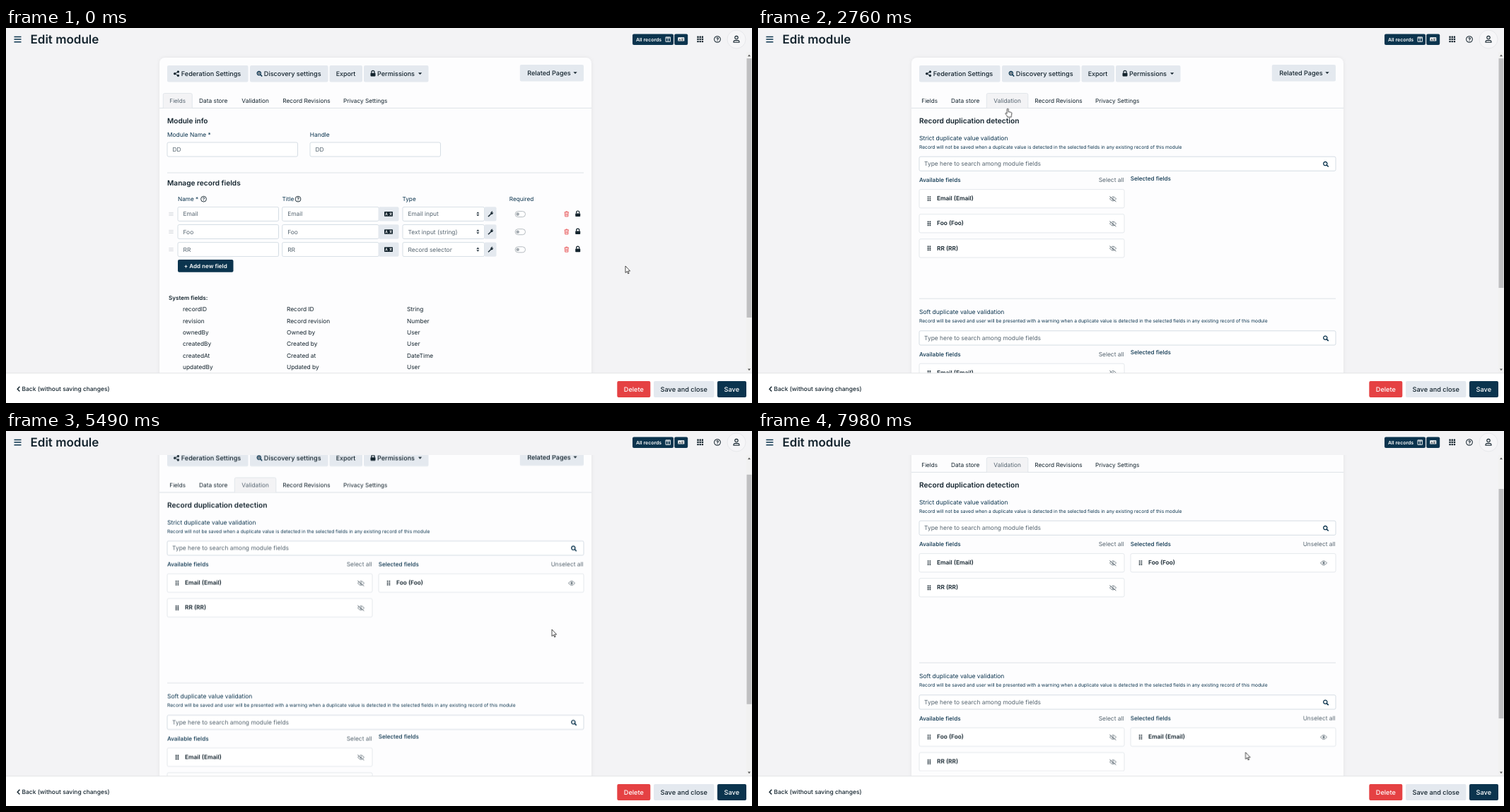
These frames come from a looping animation (1055x531 px, 8 s). An HTML page:

```html
<!DOCTYPE html>
<html lang="en">
<head>
<meta charset="utf-8">
<title>Edit module</title>
<style>
  html, body { margin: 0; width: 100%; height: 100%; overflow: hidden; background: #f3f3f5; }
  svg { display: block; width: 100vw; height: 100vh; }
  text { font-family: Inter, "Open Sans", sans-serif; fill: #14242e; text-rendering: geometricPrecision; white-space: pre; }
  .m { font-weight: 500; }
  .b { font-weight: 600; }
  .c { text-anchor: middle; }
  .e { text-anchor: end; }
  .g { fill: #566570; }
  .n { fill: #0b344e; }
  .w { fill: #fff; }
  .page { animation: page 8s infinite; }
  .thumb { animation: thumb 8s infinite; }
  @keyframes page {
    0%, 67.5% { transform: none; animation-timing-function: cubic-bezier(.25, .46, .45, .94); }
    71.75%, 100% { transform: translateY(-55px); }
  }
  @keyframes thumb {
    0%, 67.5% { transform: none; animation-timing-function: cubic-bezier(.25, .46, .45, .94); }
    71.75%, 100% { transform: translateY(39px); }
  }
</style>
</head>
<body>
<svg id="stage" viewBox="0 0 1055 531" xmlns="http://www.w3.org/2000/svg">
  <defs>
    <clipPath id="view"><rect y="34" width="1047" height="455"/></clipPath>
    <filter id="soft" x="-5%" y="-5%" width="110%" height="110%"><feDropShadow dx="0" dy="0" stdDeviation="2.5" flood-color="#1a2a3a" flood-opacity=".07"/></filter>
    <g id="share" fill="#14242e" stroke="#14242e"><path d="M2.5-2.6-2.4 0 2.5 2.6" fill="none"/><circle cx="2.4" cy="-2.7" r="1.2"/><circle cx="-2.4" r="1.2"/><circle cx="2.4" cy="2.7" r="1.2"/></g>
    <g id="lens" fill="none" stroke="#0b344e" stroke-width="1.3"><circle cx="-.7" cy="-.7" r="2.6"/><path d="M1.2 1.2 3.7 3.7" stroke-width="1.7"/></g>
    <g id="zoom"><use href="#lens"/><path d="M-2.1-.7H.7M-.7-2.1V.7" stroke="#14242e" stroke-width=".8"/></g>
    <g id="lock"><rect x="-3.5" y="-.7" width="7" height="4.6" rx=".8" fill="#14242e"/><path d="M-2.1-.5V-2a2.1 2.1 0 0 1 4.2 0V-.5" fill="none" stroke="#14242e" stroke-width="1.2"/></g>
    <path id="caret" d="M-2.6-1.2H2.6L0 1.6Z" fill="#14242e"/>
    <path id="sort" d="M-2-.7 0-3.2 2-.7ZM-2 .7 0 3.2 2 .7Z" fill="#2c3a44"/>
    <g id="help"><circle r="3.9" fill="none" stroke="#14242e" stroke-width=".9"/><path d="M-1.2-1Q-1-2.1 0-2.1 1.3-2 1.2-.9 1-.2 0 .2V.8M0 1.5V2.4" fill="none" stroke="#14242e" stroke-width=".9"/></g>
    <path id="wrench" d="M-3.2 3.2.6-.6A2.4 2.4 0 0 1 3-3.6L1.9-2.2 2.4-1.4 3.6-2.2A2.4 2.4 0 0 1 1 .4L-2.2 3.7A.8.8 0 0 1-3.2 3.2Z" fill="#14242e" stroke="#14242e" stroke-width=".5"/>
    <path id="trash" d="M-3.2-2.5H3.2M-1.1-2.7V-3.5H1.1V-2.7M-2.4-2.3-2.1 3.5H2.1L2.4-2.3M-.8-.9V2.2M.8-.9V2.2" fill="none" stroke="#e54143" stroke-width=".8"/>
    <path id="drag" d="M-3.2-2H3.2M-3.2 0H3.2M-3.2 2H3.2" stroke="#d5d9dd" stroke-width=".9"/>
    <path id="grip" d="M-1.4-3.3V3.4M1.4-3.3V3.4" stroke="#14242e" stroke-width="1.7" stroke-dasharray="1.7 .8"/>
    <g id="lang"><rect x="-6" y="-3.3" width="12" height="6.6" rx=".7" fill="#14242e"/><path d="M-4.4 1.9-3 -1.9-1.6 1.9M-3.9.7H-2.1M1.4-1.2H4.8M3.1-2V-1.2M4.2-1Q3.6 1 1.6 1.9M2-.9Q2.8 1.2 4.7 1.8" fill="none" stroke="#fff" stroke-width=".7"/></g>
    <g id="eye" fill="none" stroke="#66737c" stroke-width=".9"><path d="M-4.5 0Q0-6 4.5 0 0 6-4.5 0Z"/><circle r="1.2" fill="#66737c"/></g>
    <g id="hide"><use href="#eye"/><path d="M-4.3-4 4.7 3.4" stroke="#fff" stroke-width="1.2"/><path d="M-4.7-3.4 4.4 4" stroke="#4d5b65" stroke-width=".9"/></g>
    <g id="toggle"><rect x="-7.2" y="-4" width="14.4" height="8" rx="4" fill="#fff" stroke="#a4abb1" stroke-width=".8"/><circle cx="-3.6" r="2.3" fill="#a4abb1"/></g>
  </defs>
</svg>
<script>
const NAVY = '#0b344e', PALE = '#e4e9ef', LINE = '#dde2e7', EDGE = '#cbd5de';

const text = (x, y, size, s, cls = '') =>
  `<text x="${x}" y="${y + size * .36}" font-size="${size}" class="${cls}">${s}</text>`;
const rect = (x, y, w, h, fill, stroke = 'none', r = 2) =>
  `<rect x="${x}" y="${y}" width="${w}" height="${h}" rx="${r}" fill="${fill}" stroke="${stroke}" stroke-width=".8"/>`;
const icon = (id, x, y) => `<use href="#${id}" x="${x}" y="${y}"/>`;
const rule = (x, y, w) => `<path d="M${x} ${y}h${w}" stroke="${LINE}"/>`;
const group = (cls, ...parts) => `<g class="${cls}">${parts.join('')}</g>`;

let css = '';
// Times alternate between on and off.
const show = (name, ...times) => {
  const keys = times.map((t, i) => `${t / 80}%{opacity:${1 - i % 2}}`).join('');
  css += `@keyframes ${name}{0%,100%{opacity:0}${keys}}.${name}{animation:${name} 8s step-end infinite}`;
};

const header = () => {
  let dots = '';
  for (let i = 0; i < 9; i++) dots += rect(977.4 + i % 3 * 3.2, 11.6 + Math.floor(i / 3) * 3.2, 2.3, 2.3, '#14242e', 'none', .4);
  return `<path d="M11.5 12.4h10M11.5 16.1h10M11.5 19.8h10" stroke="${NAVY}" stroke-width="1.5"/>`
    + text(34.5, 16, 17, 'Edit module', 'b')
    + rect(886, 8.5, 58, 15.5, NAVY) + rect(945.2, 8.5, 19, 15.5, NAVY)
    + text(891, 16.2, 6.95, 'All records', 'b w')
    + `<path d="M933 12.9h6.4v6.4h-6.4zM933 14.1h6.4M936.2 13v6.2" fill="none" stroke="#fff" stroke-width=".9"/>`
    + rect(950.3, 13.2, 9, 5.4, '#fff', 'none', .6)
    + text(954.8, 16, 4.2, 'A文', 'c b')
    + dots + `<use href="#help" transform="translate(1006 16) scale(1.12)"/>`
    + `<circle cx="1033" cy="16" r="13" fill="#f6f6f8" stroke="#e2e4e8" stroke-width=".8"/>`
    + `<g fill="none" stroke="#14242e" stroke-width="1.1"><circle cx="1033" cy="13.6" r="2.2"/><path d="M1029 20.2v-.6q0-2 2-2h4q2 0 2 2v.6z"/></g>`;
};

const toolbar = () =>
  rect(228, 53, 114.5, 23.5, PALE) + icon('share', 241, 64.7) + text(290, 64.7, 9.1, 'Federation Settings', 'm c')
  + rect(345, 53, 110.5, 23.5, PALE) + icon('zoom', 358.5, 64.8) + text(405.2, 64.7, 9.1, 'Discovery settings', 'm c')
  + rect(457.5, 53, 46.5, 23.5, PALE) + text(480.5, 64.7, 8.9, 'Export', 'm c')
  + rect(506, 53, 91.5, 23.5, PALE) + icon('lock', 519, 64.5) + text(551.5, 64.7, 9.1, 'Permissions', 'm c') + icon('caret', 585.6, 64.5)
  + rect(726.8, 52, 90.2, 23.5, PALE) + text(768, 63.7, 9.05, 'Related Pages', 'm c') + icon('caret', 805, 63.5);

const tab = (x, w, stroke, fill) =>
  `<path d="M${x} 113.3V94.5q0-2 2-2h${w - 4}q2 0 2 2V113.3" fill="${fill}" stroke="${stroke}" stroke-width=".8"/>`;
const tabs = () => {
  const names = [['Fields', 242.7, 8.1], ['Data store', 293.2, 8.4], ['Validation', 352.7, 8.4], ['Record Revisions', 425, 8.3], ['Privacy Settings', 508.2, 8.2]];
  return rule(217, 113.4, 611)
    + group('onFields', tab(222.3, 41, LINE, '#f3f3f5'))
    + group('hover', tab(323.3, 58.5, '#eceef1', 'none'))
    + group('onValid', tab(323.3, 58.5, LINE, '#f3f3f5'))
    + names.map(([s, x, size], i) => i === 0 || i === 2
      ? group(i ? 'onFields' : 'onValid', text(x, 102.7, size, s, 'c')) + group(i ? 'onValid' : 'onFields', text(x, 102.7, size, s, 'c g'))
      : text(x, 102.7, size, s, 'c')).join('');
};

const input = (x, y, w, s) => rect(x, y - 10, w, 20, '#fff', EDGE) + text(x + 7.5, y, 8.4, s, 'g');

const fieldRow = ([name, type], i) => {
  const y = 263.4 + i * 25.1;
  return icon('drag', 233.5, y) + input(243, y, 142.5, name) + input(390.7, y, 136.5, name)
    + rect(527, y - 10.2, 28.5, 20.4, PALE) + icon('lang', 541, y)
    + input(561, y, 115.5, type) + icon('sort', 667.3, y)
    + rect(676.5, y - 10.2, 17, 20.4, PALE) + icon('wrench', 685, y)
    + icon('toggle', 727.3, y + .2) + icon('trash', 792.8, y) + icon('lock', 808.7, y - .3);
};

const fieldsPage = () => {
  const rows = [['Email', 'Email input'], ['Foo', 'Text input (string)'], ['RR', 'Record selector']];
  const system = ['recordID,Record ID,String', 'revision,Record revision,Number', 'ownedBy,Owned by,User',
    'createdBy,Created by,User', 'createdAt,Created at,DateTime', 'updatedBy,Updated by,User', 'updatedAt,Updated at,DateTime'];
  return text(228, 131, 10.05, 'Module info', 'b')
    + text(228, 151, 8.4, 'Module Name *', 'n') + text(429.8, 151, 8.4, 'Handle', 'n')
    + input(228, 172, 184.5, 'DD') + input(430, 172, 184.5, 'DD') + rule(228, 205, 589)
    + text(228, 219.5, 10.15, 'Manage record fields', 'b')
    + text(243, 242.3, 8.2, 'Name *', 'n') + icon('help', 279.5, 242.2)
    + text(390.5, 242.3, 8.2, 'Title', 'n') + icon('help', 413, 242.2)
    + text(560.5, 242.3, 8.2, 'Type', 'n') + text(711.8, 242.3, 8.2, 'Required', 'n')
    + rows.map(fieldRow).join('')
    + rect(243, 328, 78.5, 17.8, NAVY) + text(282.2, 336.8, 8.1, '+ Add new field', 'b w c')
    + text(230, 381.8, 8.05, 'System fields:', 'b')
    + system.map((line, i) => line.split(',').map((s, j) => text([250, 397, 567][j], 398.2 + i * 16.4, 8.35, s)).join('')).join('');
};

const card = (x, y, name, mark) =>
  rect(x, y, 290, 26.2, '#fff', LINE) + icon('grip', x + 14, y + 13.1)
  + text(x + 25, y + 12.7, 8.35, `${name} (${name})`, 'b') + icon(mark, x + (mark === 'eye' ? 273 : 274), y + 13.3);
const cards = (x, y, names, mark) => names.map((n, i) => card(x, y + i * 35.1, n, mark)).join('');

const section = (dy, title, hint, rest, picked, before, after) =>
  `<g transform="translate(0 ${dy})">`
  + text(228, 155.5, 8.5, title, 'n') + text(228, 168.2, 6.68, hint, 'n')
  + rect(228, 182.2, 589, 20.2, '#fff', EDGE) + text(235, 192.3, 8.43, 'Type here to search among module fields', 'g') + icon('lens', 803, 192.8)
  + text(228, 215.4, 8.15, 'Available fields', 'm n') + text(517.5, 215.4, 8.4, 'Select all', 'g e')
  + group(before, text(526.8, 212.8, 8.05, 'Selected fields', 'm n'), cards(228, 228.6, ['Email', 'Foo', 'RR'], 'hide'))
  + group(after, text(526.8, 215.4, 8.05, 'Selected fields', 'm n'), text(816.5, 215.4, 8.35, 'Unselect all', 'g e'),
    cards(228, 228.6, rest, 'hide'), cards(527, 228.6, [picked], 'eye'))
  + '</g>';

const validationPage = () => {
  const tail = 'a duplicate value is detected in the selected fields in any existing record of this module';
  return text(228, 131, 10.2, 'Record duplication detection', 'b')
    + section(0, 'Strict duplicate value validation', 'Record will not be saved when ' + tail, ['Email', 'RR'], 'Foo', 'strict0', 'strict1')
    + rule(228, 383.2, 589)
    + section(246.6, 'Soft duplicate value validation', 'Record will be saved and user will be presented with a warning when ' + tail, ['Foo', 'RR'], 'Email', 'soft0', 'soft1');
};

const scrollbar = () =>
  rect(1047, 34, 8, 455, '#f1f1f1', 'none', 0)
  + '<path d="M1049 40.2h4l-2-2.6zM1049 482.6h4l-2 2.6z" fill="#555"/>'
  + group('onFields', rect(1047.5, 43, 7, 367, '#bfbfc1', 'none', 0))
  + group('onValid', group('thumb', rect(1047.5, 43, 7, 325, '#bfbfc1', 'none', 0)));

const footer = () =>
  rect(0, 489, 1055, 42, '#fff', 'none', 0) + rect(0, 488.2, 1055, 1, '#e3e4e7', 'none', 0)
  + `<path d="M19.4 507.8 16.2 511.2 19.4 514.6" fill="none" stroke="#14242e" stroke-width="1.4"/>`
  + text(22.5, 511.2, 8.45, 'Back (without saving changes)', 'm')
  + rect(864.3, 500, 47, 23, '#e54143') + text(887.8, 511.6, 9.1, 'Delete', 'm w c')
  + rect(916, 500, 85.5, 23, PALE) + text(958.7, 511.6, 9.2, 'Save and close', 'm c')
  + rect(1006, 500, 41, 23, NAVY) + text(1026.3, 511.6, 9.2, 'Save', 'm w c');

const pointer = () => group('cursor',
  '<path class="arrow" d="M0 0V9.6L2.2 7.6 3.7 10.9 5.1 10.3 3.6 7.1H6.6Z" fill="#fff" stroke="#222" stroke-width=".8"/>',
  '<path class="hand" d="M-1 .9C-1-.3 1-.3 1 .9V4.5L5 5.3Q6 5.6 5.8 7L5.1 10.5V12H-.6V10.8L-3.2 7.3Q-3.4 5.8-2 6.2L-1 7Z" fill="#fff" stroke="#222" stroke-width=".8"/>',
  '<path class="beam" d="M-1.8-4H-.5L0-3.6.5-4H1.8M0-3.6V3.6M-1.8 4H-.5L0 3.6.5 4H1.8" fill="none" stroke="#222" stroke-width=".8"/>');

show('onFields', 0, 2510);
show('onValid', 2510);
show('hover', 1900, 2510);
show('strict0', 0, 4360);
show('strict1', 4360);
show('soft0', 0, 7540);
show('soft1', 7540);

const hand = [1600, 2850, 3290, 3340, 3580, 4430, 6600, 7800];
const beam = [1230, 1330, 3090, 3180, 6330, 6410];
show('hand', ...hand);
show('beam', ...beam);
show('arrow', 0, ...[...hand, ...beam].sort((a, b) => a - b));

// Pointer route: time, x, y.
const route = [
  [0, 876, 337], [540, 876, 337], [700, 860, 344], [900, 760, 351], [1080, 620, 345], [1250, 468, 316],
  [1310, 386, 260], [1400, 362, 205], [1550, 350, 150], [1750, 348, 118], [2070, 350, 107.5], [2650, 350, 107.5],
  [2760, 353, 114], [2900, 372, 135], [3100, 440, 185], [3310, 487, 216], [3500, 498, 250], [3670, 502, 270],
  [3920, 502, 270], [3990, 503, 273], [4370, 503, 273], [4450, 520, 278], [4700, 660, 290], [4950, 755, 285],
  [5110, 772, 281], [6030, 772, 281], [6150, 735, 305], [6360, 577, 379], [6520, 515, 420], [6730, 501, 431],
  [7340, 501, 431], [7350, 501, 429], [7770, 501, 429], [7850, 600, 442], [7910, 660, 450], [7980, 689.5, 455], [8000, 689.5, 455]
];
css += `@keyframes route{${route.map(([t, x, y]) => `${t / 80}%{transform:translate(${x}px,${y}px)}`).join('')}}.cursor{animation:route 8s linear infinite}`;

const style = document.createElement('style');
style.textContent = css;
document.head.append(style);

document.getElementById('stage').insertAdjacentHTML('beforeend',
  rect(0, 0, 1055, 531, '#f3f3f5', 'none', 0)
  + '<g clip-path="url(#view)">' + group('page',
    `<g filter="url(#soft)">${rect(217, 42, 611, 600, '#fdfdfe', 'none', 8)}</g>`,
    toolbar(), tabs(), group('onFields', fieldsPage()), group('onValid', validationPage()))
  + '</g>' + header() + scrollbar() + footer() + pointer());
</script>
</body>
</html>
```
